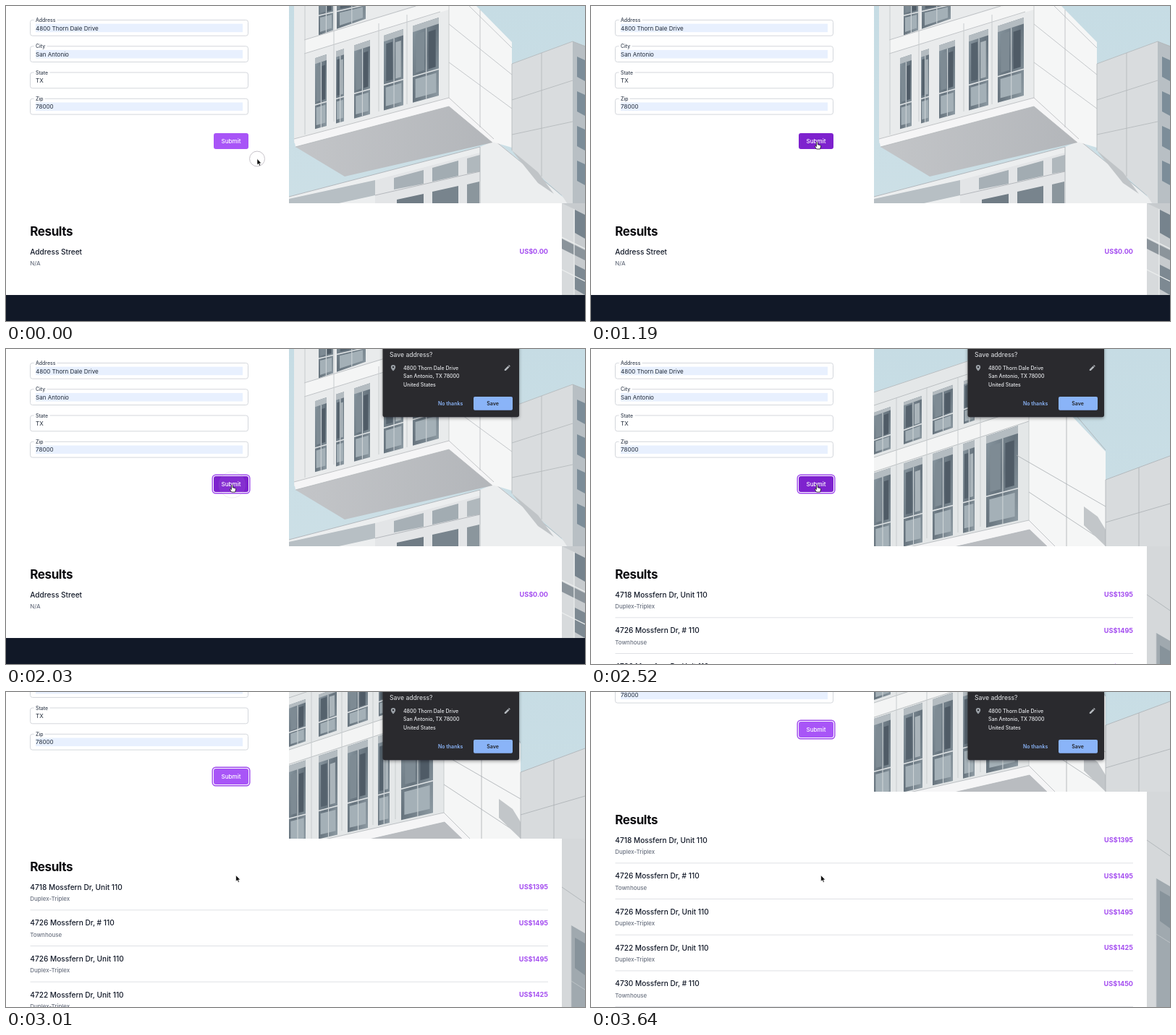
Animation of 800 by 436 pixels, one loop 4.27 s. Source, as an HTML page:

```html
<!DOCTYPE html>
<html lang="en">
<head>
<meta charset="utf-8">
<title>Rent lookup form</title>
<style>
  html, body { margin: 0; width: 100%; height: 100%; overflow: hidden; background: #fff; }
  svg { display: block; width: 800px; height: 436px; }
  text { font-family: Inter, "Open Sans", sans-serif; white-space: pre; }
</style>
</head>
<body>
<svg id="stage" viewBox="0 0 800 436" xmlns="http://www.w3.org/2000/svg">
  <defs>
    <linearGradient id="glass" x1="0" y1="0" x2="1" y2="1">
      <stop offset="0" stop-color="#8c9aa3"/><stop offset=".5" stop-color="#67747e"/><stop offset="1" stop-color="#909da5"/>
    </linearGradient>
    <linearGradient id="sky" x1="0" y1="0" x2="0" y2="1">
      <stop offset="0" stop-color="#c6dce4"/><stop offset="1" stop-color="#cfe1e7"/>
    </linearGradient>
    <linearGradient id="under" x1="0" y1="0" x2="1" y2="0">
      <stop offset="0" stop-color="#c3c5c8"/><stop offset="1" stop-color="#b3b6ba"/>
    </linearGradient>
    <filter id="soft" x="-10%" y="-10%" width="120%" height="130%">
      <feDropShadow dx="0" dy="1.5" stdDeviation="2" flood-opacity=".4"/>
    </filter>
  </defs>
  <g id="page"></g>
  <g id="dialog"></g>
  <circle id="ripple" fill="#fff" fill-opacity=".3" stroke="#a9a3ad" stroke-width="1"/>
  <path id="arrow" d="M0 0V8.4L1.9 6.7 3.2 9.7 4.6 9.1 3.4 6.2H5.9Z" fill="#000" stroke="#fff" stroke-width=".6"/>
  <path id="hand" d="M-.9 .8Q0-.5.9.8V3.7L4.6 4.7Q5.5 5 5.2 6.8L4.3 10H-.7L-3 6.7Q-3 5.3-1.8 5.8L-.9 6.6Z" fill="#fff" stroke="#111" stroke-width=".8"/>
</svg>
<script>
const LOOP = 4270, STEP = 70;
const CLICK = 1720, DIALOG = 1890, LOADED = 2170;
const $ = id => document.getElementById(id);

const poly = (pts, fill) => `<polygon points="${pts}" fill="${fill}"/>`;
const line = (d, color = '#a9adb1', w = .8) => `<path d="${d}" fill="none" stroke="${color}" stroke-width="${w}"/>`;
const rect = (x, y, w, h, fill, extra = '') =>
  `<rect x="${x}" y="${y}" width="${w}" height="${h}" fill="${fill}" ${extra}/>`;
// y is the middle of the capitals
const text = (x, y, size, weight, color, str, extra = '') =>
  `<text x="${x}" y="${y + size * .364}" font-size="${size}" font-weight="${weight}" fill="${color}" ${extra}>${str}</text>`;

// A row of tall panes between two slanted lines
function panes(spans, top, bottom) {
  return spans.map(([a, b], i) => {
    const at = (u, v) => {
      const x = a + (b - a) * u;
      return `${x} ${top(x) + (bottom(x) - top(x)) * v}`;
    };
    const quad = (u0, v0, u1, v1, fill) =>
      poly([at(u0, v0), at(u1, v0), at(u1, v1), at(u0, v1)].join(' '), fill);
    return quad(0, 0, 1, 1, 'url(#glass)') +
      quad(0, 0, 1, .08, '#b4bcc1') +
      quad(.12, .12, .45, .62, i % 2 ? '#55626d' : '#7e8b94') +
      quad(.6, .14, .88, .62, i % 2 ? '#aab4ba' : '#4f5b66') +
      quad(.1, .7, .9, .95, '#a4b0b7') +
      line(`M${at(0, .66)}L${at(1, .66)}`, '#dfe3e5', 1.6) +
      line(`M${at(.52, .08)}L${at(.52, 1)}`, '#cdd3d6', 1.1);
  }).join('');
}

function photoNear() {
  const top = x => 72 - (x - 428) * .33, bottom = x => 170 - (x - 428) * .27;
  return rect(391, 0, 409, 400, 'url(#sky)') +
    // lower block
    poly('391 264 655 195 676 186 800 290 800 400 391 400', '#eceeef') +
    poly('391 273 391 267 510 241 510 262 460 273', '#b7bfc4') +
    poly('510 241 655 203 655 273 510 273', '#e3e5e7') +
    poly('536 238 577 227 577 246 536 254', '#a7b0b6') +
    poly('589 224 625 214 625 235 589 243', '#a2acb2') +
    poly('637 211 655 206 655 229 637 232', '#b0b8bd') +
    poly('540 268 577 260 577 273 540 273', '#707c85') +
    poly('589 257 625 249 625 273 589 273', '#78848d') +
    poly('637 247 654 243 654 273 637 273', '#8b969d') +
    line('M391 264L655 195M510 262L655 229M655 195V273M676 187L768 262') +
    // cube
    poly('398 -2 612 -2 612 137 398 190', '#e9ebec') +
    poly('612 0 650 0 699 50 699 196 672 188 612 130', '#f5f6f6') +
    panes([[432, 452], [457, 497]], () => -40, x => 42 - (x - 428) * .35) +
    panes([[427, 443], [456, 467], [481, 503], [522, 549], [562, 598]], top, bottom) +
    poly('412 47 570 0 612 0 612 5 412 66', '#f4f5f5') +
    line('M412 47L566 0M412 66L600 8', '#b4b8bb') +
    line('M413 0V178M453 0V160M515 24V146M554 12V136', '#c8ccce', 1) +
    line('M612 0V130', '#c0c4c6') +
    poly('398 184 612 127 674 184 672 190 612 139 400 195', '#f5f5f6') +
    poly('400 195 612 139 672 189 468 236', 'url(#under)') +
    line('M398 184L612 127L674 184M400 195L612 139L672 189', '#b6b9bc') +
    line('M612 25L699 95M612 78L699 142M655 5V168M640 0L699 58', '#b8bcbf') +
    // tower
    poly('699 80 783 49 783 285 768 262 699 200', '#d9dcde') +
    poly('783 49 800 55 800 400 783 400', '#b8bfc4') +
    poly('699 200 735 230 757 260 735 245', '#c0c4c7') +
    line('M699 80L783 49L800 56M699 130L783 103M699 178L783 160M740 65V236M699 80V200', '#b2b6b9') +
    [70, 118, 166, 214].map(y => poly(`789 ${y} 800 ${y + 5} 800 ${y + 34} 789 ${y + 28}`, '#7c8d99')).join('') +
    // strip beside the results
    rect(768, 273, 32, 127, '#c7cbce') +
    poly('768 273 785 281 785 400 768 400', '#d7dadc') +
    poly('768 322 800 338 800 352 768 336', '#8b949b') +
    poly('786 282 800 289 800 322 786 314', '#76838d') +
    poly('786 358 800 365 800 400 786 392', '#7d8992') +
    line('M768 320L800 336M768 365L800 381M785 281V400', '#eceeee', 1.2);
}

function photoFar() {
  const top = x => 172 - (x - 391) * .33, bottom = x => 283 - (x - 391) * .23;
  return rect(391, 0, 409, 571, 'url(#sky)') +
    poly('391 60 605 -12 605 250 391 300', '#e4e7e8') +
    poly('605 30 711 142 711 273 640 273 605 238', '#f5f6f6') +
    panes([[391, 414], [432, 457], [472, 500], [515, 530], [548, 590]],
      x => 88 - (x - 391) * .35, x => 146 - (x - 391) * .34) +
    panes([[391, 414], [432, 458], [472, 500], [514, 530], [546, 590]], top, bottom) +
    poly('391 150 605 80 605 100 391 170', '#f3f4f4') +
    line('M391 60L520 17M391 78L520 35M391 150L605 80M391 170L605 100', '#b1b6b9') +
    line('M422 68V273M464 54V262M507 40V254M538 95V246M605 94V238', '#c9cdcf', 1) +
    poly('391 286 605 237 641 273 628 273 606 250 480 279', '#f5f5f6') +
    poly('480 279 606 250 632 275', '#b9bcc0') +
    line('M391 285L605 237L641 273M480 279L606 250L632 275', '#b4b8bb') +
    line('M588 147L711 218M605 198L711 268M657 94V273M672 94L711 140', '#a9aeb2') +
    poly('681 218 700 232 711 250 711 273 681 244', '#c2c6c9') +
    // tower
    poly('711 181 800 148 800 571 768 571 711 300', '#d8dbdd') +
    line('M711 181L800 148M711 181V273M711 240L800 214M757 164V273', '#abb0b4') +
    rect(768, 273, 32, 298, '#d5d8da') +
    line('M768 340L800 362', '#aab0b4') +
    poly('781 393 800 404 800 571 781 571', '#a0a9af') +
    poly('786 410 800 418 800 462 786 452', '#8793 9b'.replace(' ', '')) +
    line('M781 393V571M781 470L800 482', '#c3c8cb');
}

const FIELDS = [
  ['Address', '4800 Thorn Dale Drive', 32], ['City', 'San Antonio', 18],
  ['State', 'TX', 22], ['Zip', '78000', 15]];
const field = ([label, value, w], i) => {
  const y = 19.4 + i * 36.3;
  return rect(33.5, y, 301, 21.8, '#fff', 'rx="3" stroke="#d4d7dc" stroke-width="1"') +
    (label === 'State' ? '' : rect(41, y + 5.2, 286, 11.6, '#e8f0fe')) +
    rect(38.5, y - 3, w, 6, '#fff') +
    text(41, y, 6.9, 500, '#374151', label) +
    text(41, y + 11.2, 8.05, 400, '#1f2937', value);
};

const HOMES = [
  ['4718 Mossfern Dr, Unit 110', 'Duplex-Triplex', 1395],
  ['4726 Mossfern Dr, # 110', 'Townhouse', 1495],
  ['4726 Mossfern Dr, Unit 110', 'Duplex-Triplex', 1495],
  ['4722 Mossfern Dr, Unit 110', 'Duplex-Triplex', 1425],
  ['4730 Mossfern Dr, # 110', 'Townhouse', 1450]];
const row = (title, kind, price, y) =>
  text(33.3, y, 10.1, 500, '#111827', title) +
  text(33.3, y + 16.2, 7.95, 500, '#6b7280', kind) +
  text(749, y, 9.1, 700, '#a44df0', 'US$' + price, 'text-anchor="end"');

$('page').innerHTML =
  `<g id="near">${photoNear()}</g><g id="far">${photoFar()}</g>` +
  rect(0, 0, 391, 600, '#fff') + rect(0, 273, 768, 400, '#fff') +
  FIELDS.map(field).join('') +
  rect(285.2, 174.2, 51.6, 25.6, '#fff', 'id="focus" rx="4.5" stroke="#9d46ec" stroke-width="1.4"') +
  rect(287, 176, 48, 22, '#a855f7', 'id="button" rx="3"') +
  text(311, 187, 8.1, 500, '#fff', 'Submit', 'text-anchor="middle"') +
  text(33.3, 312.3, 17, 700, '#0b0b0f', 'Results', 'letter-spacing="-.42"') +
  `<g id="empty">${row('Address Street', 'N/A', '0.00', 340)}${rect(0, 400, 800, 36, '#111827')}</g>` +
  `<g id="homes">${HOMES.map(([a, b, c], i) => row(a, b, c, 340 + i * 49.7) +
    line(`M33.5 ${371.8 + i * 49.7}H749`, '#dfe1e5', 1)).join('')}</g>`;

$('dialog').innerHTML =
  rect(520.5, -8, 188.5, 102.3, '#292a2d', 'rx="3" filter="url(#soft)"') +
  text(530, 7.6, 8.65, 400, '#e8eaed', 'Save address?') +
  '<path d="M535 30.6Q531.8 26.8 531.8 25.2A3.2 3.2 0 0 1 538.2 25.2Q538.2 26.8 535 30.6ZM535 23.9A1.2 1.2 0 1 0 535 26.3A1.2 1.2 0 1 0 535 23.9Z" fill="#9aa0a6" fill-rule="evenodd"/>' +
  '<path d="M688.8 30V28.2L693.6 23.4 695.4 25.2 690.6 30ZM694.1 22.9L695 22 696.8 23.8 695.9 24.7Z" fill="#b4b8bd"/>' +
  ['4800 Thorn Dale Drive', 'San Antonio, TX 78000', 'United States']
    .map((s, i) => text(549, 26 + i * 11.7, 7, 500, '#e8eaed', s)).join('') +
  text(597, 75.3, 7, 600, '#8ab4f8', 'No thanks') +
  rect(646, 66, 54, 18.8, '#8ab4f8', 'rx="2"') +
  text(672.5, 75.3, 7, 600, '#202124', 'Save', 'text-anchor="middle"');

const SCROLL = [[2800, 0], [2870, 6], [2940, 32], [3010, 70], [3080, 103], [3150, 129], [3220, 134], [3290, 135]];
const MOVES = [[420, 910, 347, 211.5, 312.3, 188], [2590, 2870, 312.3, 188, 317.7, 253.7]];

function along(keys, t) {
  const i = keys.findIndex(k => k[0] > t);
  if (i === 0) return keys[0][1];
  if (i < 0) return keys[keys.length - 1][1];
  const [t0, a] = keys[i - 1], [t1, b] = keys[i];
  return a + (b - a) * (t - t0) / (t1 - t0);
}

function pointer(t) {
  const [t0, t1, x0, y0, x1, y1] = MOVES[t < MOVES[1][0] ? 0 : 1];
  const u = Math.min(1, Math.max(0, (t - t0) / (t1 - t0)));
  const e = u * u * (3 - 2 * u);
  return [x0 + (x1 - x0) * e, y0 + (y1 - y0) * e];
}

const show = (id, on) => $(id).setAttribute('display', on ? 'inline' : 'none');

function draw(t) {
  const scroll = along(SCROLL, t), loaded = t >= LOADED;
  const [x, y] = pointer(t);
  const top = 176 - scroll;
  const hover = x > 287 && x < 335 && y > top && y < top + 22;

  $('page').setAttribute('transform', `translate(0 ${-scroll})`);
  show('near', !loaded);
  show('empty', !loaded);
  show('far', loaded);
  show('homes', loaded);
  show('focus', t >= CLICK);
  show('dialog', t >= DIALOG);
  $('button').setAttribute('fill', hover ? '#7e22ce' : '#a855f7');

  show('hand', hover);
  show('arrow', !hover);
  $(hover ? 'hand' : 'arrow').setAttribute('transform', `translate(${x} ${y})`);

  const age = t < CLICK ? t + 130 : t - CLICK;
  show('ripple', age < 380);
  $('ripple').setAttribute('cx', x);
  $('ripple').setAttribute('cy', y);
  $('ripple').setAttribute('r', 5 + age * .042);
  $('ripple').setAttribute('opacity', Math.max(0, 1 - age / 380));
}

const start = performance.now();
function tick() {
  const t = (performance.now() - start) % LOOP;
  draw(Math.floor(t / STEP) * STEP);
  requestAnimationFrame(tick);
}
draw(0);
requestAnimationFrame(tick);
</script>
</body>
</html>
```
